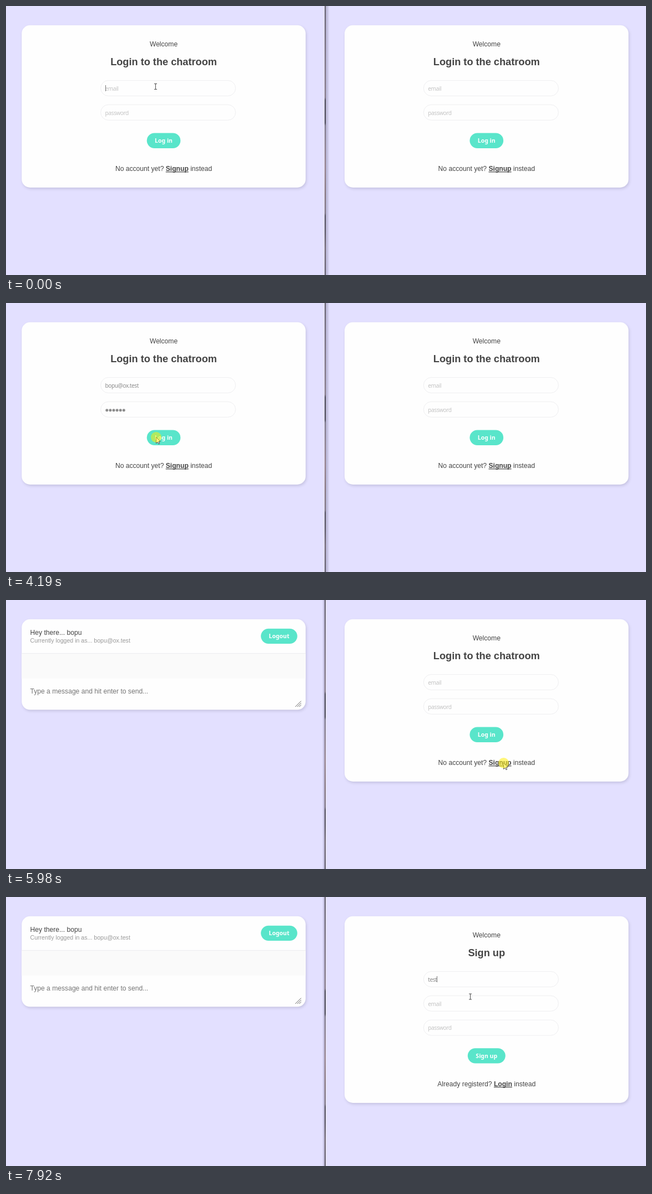
An HTML page with a canvas for the animation above (7990 ms loop, 1153 by 486 pixels).

```html
<!DOCTYPE html>
<html lang="en">
<head>
<meta charset="utf-8">
<title>Chatroom login</title>
<style>
html, body { margin: 0; width: 100%; height: 100%; overflow: hidden; background: #e3e0ff; }
canvas { display: block; width: 1153px; height: 486px; }
</style>
</head>
<body>
<canvas id="stage"></canvas>
<script>
const W = 1153, H = 486, LOOP = 7990;
const canvas = document.getElementById('stage');
const ratio = window.devicePixelRatio || 1;
canvas.width = Math.round(W * ratio);
canvas.height = Math.round(H * ratio);
const ctx = canvas.getContext('2d', { alpha: false });

const SANS = '"Liberation Sans", Arial, sans-serif';
const BODY = `12.12px ${SANS}`;
const BOLD = `bold 12.12px ${SANS}`;
const SMALL = `10.6px ${SANS}`;
const HEADING = `bold 18.18px ${SANS}`;
const FIELD = '10.2px "Noto Sans", sans-serif';
const BUTTON = 'bold 10.5px "Noto Sans", sans-serif';

const INK = '#444', GREY = '#8c8c8c', HINT = '#c4c4c4', TEAL = '#59e5ca';
const NAME = 'bopu', EMAIL = NAME + '@ox.test';
const LEFT = 28.3, RIGHT = 610, CARD_W = 511.5;
const FIELD_TOPS = [134, 177.8, 221.6];
const DOT_STEP = 6.1;

const NAME_KEYS = [610, 750, 950, 1020];
const DOT_KEYS = [2490, 2590, 2690, 3150, 3290, 3430];
const TEST_KEYS = [7510, 7580, 7720, 7790];
const LOGIN_AT = 4530, FOCUS_AT = 5980, SIGNUP_AT = 6040;

// time, x, y of the pointer
const PATH = [
  [0, 269.5, 145.5], [3500, 269.5, 145.5], [3910, 263, 248], [3980, 258, 250],
  [4100, 270.5, 242.5], [4600, 270.5, 242.5], [5090, 857, 241.5],
  [5400, 896, 299], [5510, 892.5, 302], [5710, 892.5, 302],
  [5780, 896.5, 294.5], [6400, 896.5, 294.5], [7000, 848.5, 153.5],
  [7780, 848.5, 153.5], [7920, 836.5, 180]
];

const within = (t, a, b) => t >= a && t < b;
const typed = (keys, t) => keys.filter(k => t >= k).length;

function text(str, x, y, font, color, align = 'left', spacing = 0) {
  ctx.font = font;
  ctx.letterSpacing = spacing + 'px';
  ctx.fillStyle = color;
  ctx.textAlign = align;
  ctx.fillText(str, x, y);
  return ctx.measureText(str).width;
}

function pill(x, y, w, h, r) {
  ctx.beginPath();
  ctx.roundRect(x, y, w, h, r);
}

function card(x, bottom) {
  ctx.save();
  ctx.shadowColor = 'rgba(50,50,80,0.17)';
  ctx.shadowOffsetX = 1.5 * ratio;
  ctx.shadowOffsetY = 2.5 * ratio;
  ctx.shadowBlur = 5 * ratio;
  ctx.fillStyle = '#fefefe';
  pill(x, 34.8, CARD_W, bottom - 34.8, 15);
  ctx.fill();
  ctx.restore();
}

function button(label, cx, y, w) {
  ctx.fillStyle = TEAL;
  pill(cx - w / 2, y, w, 27.3, 13.65);
  ctx.fill();
  text(label, cx, y + 17.7, BUTTON, '#fff', 'center');
}

function caret(x, top) {
  ctx.fillStyle = '#777';
  ctx.fillRect(Math.round(x), top + 9, 1, 11);
}

// value replaces the hint once something has been typed
function field(x, top, hint, value = '', showCaret = false) {
  ctx.strokeStyle = '#efeff1';
  ctx.lineWidth = 1;
  pill(x + 142.3, top + 0.5, 243, 28, 14);
  ctx.stroke();
  const left = x + 150.3, base = top + 18.8;
  const w = text(value || hint, left, base, FIELD, value ? GREY : HINT, 'left', -0.5);
  if (showCaret) caret(value ? left + w : left + 0.4, top);
}

function passwordField(x, top, hint, count, showCaret) {
  field(x, top, count ? '' : hint);
  ctx.fillStyle = GREY;
  for (let i = 0; i < count; i++) {
    ctx.beginPath();
    ctx.arc(x + 153.5 + i * DOT_STEP, top + 16, 2.5, 0, Math.PI * 2);
    ctx.fill();
  }
  if (showCaret) caret(x + 150.6 + count * DOT_STEP, top);
}

function switchLine(cx, y, before, link, after) {
  const width = (s, f) => { ctx.font = f; ctx.letterSpacing = '0px'; return ctx.measureText(s).width; };
  let x = cx - (width(before, BODY) + width(link, BOLD) + width(after, BODY)) / 2;
  x += text(before, x, y, BODY, INK);
  const w = text(link, x, y, BOLD, INK);
  ctx.fillRect(x, y + 1.2, w, 1.2);
  text(after, x + w, y, BODY, INK);
}

function titles(cx, heading) {
  text('Welcome', cx, 73.4, BODY, INK, 'center');
  text(heading, cx, 107.2, HEADING, INK, 'center');
}

function loginCard(x, email, dots, caretAt) {
  const cx = x + CARD_W / 2;
  card(x, 328);
  titles(cx, 'Login to the chatroom');
  field(x, FIELD_TOPS[0], 'email', email, caretAt === 0);
  passwordField(x, FIELD_TOPS[1], 'password', dots, caretAt === 1);
  button('Log in', cx, 229.6, 60.6);
  switchLine(cx, 298, 'No account yet? ', 'Signup', ' instead');
}

function signupCard(x, name, showCaret) {
  const cx = x + CARD_W / 2;
  card(x, 372);
  titles(cx, 'Sign up');
  field(x, FIELD_TOPS[0], 'display name', name, showCaret);
  field(x, FIELD_TOPS[1], 'email');
  field(x, FIELD_TOPS[2], 'password');
  button('Sign up', cx, 273.2, 68);
  switchLine(cx, 341.7, 'Already registerd? ', 'Login', ' instead');
}

function chatCard(x) {
  card(x, 198.3);
  text('Hey there... ' + NAME, x + 15.2, 62.5, BODY, INK);
  text('Currently logged in as... ' + EMAIL, x + 15.2, 77, SMALL, '#999');
  button('Logout', x + 463.7, 51.7, 65.6);
  ctx.fillStyle = '#fafafa';
  ctx.fillRect(x, 96.5, CARD_W, 45.5);
  ctx.fillStyle = '#ededef';
  ctx.fillRect(x, 96, CARD_W, 1);
  text('Type a message and hit enter to send...', x + 15.2, 169.2, BODY, '#757575');
  ctx.strokeStyle = '#666';
  ctx.lineWidth = 1;
  ctx.beginPath();
  for (const d of [10.5, 7, 3.5]) {
    ctx.moveTo(x + 503.4 - d, 193);
    ctx.lineTo(x + 503.4, 193 - d);
  }
  ctx.stroke();
}

function divider(rightFocused) {
  const from = 575, to = rightFocused ? 570 : 583;
  const shade = ctx.createLinearGradient(from, 0, to, 0);
  shade.addColorStop(0, 'rgba(70,65,95,0.38)');
  shade.addColorStop(1, 'rgba(70,65,95,0)');
  ctx.fillStyle = shade;
  ctx.fillRect(Math.min(from, to), 0, Math.abs(to - from), H);

  const line = ctx.createLinearGradient(0, 0, 0, H);
  [[0, '#4c484f'], [0.34, '#77686f'], [0.35, '#2c2b32'], [0.435, '#2c2b32'],
   [0.445, '#6d6874'], [0.6, '#8b7173'], [0.7, '#75605f'], [0.77, '#6b6068'],
   [0.78, '#36333a'], [0.84, '#3c383e'], [0.9, '#5d5154'], [1, '#47444d']]
    .forEach(([p, c]) => line.addColorStop(p, c));
  ctx.fillStyle = line;
  ctx.fillRect(574.2, 0, 1.6, H);
}

function pointerAt(t) {
  let i = PATH.findIndex(p => p[0] > t);
  if (i < 0) return PATH[PATH.length - 1].slice(1);
  const [t0, x0, y0] = PATH[i - 1], [t1, x1, y1] = PATH[i];
  const k = (t - t0) / (t1 - t0), e = k * k * (3 - 2 * k);
  return [x0 + (x1 - x0) * e, y0 + (y1 - y0) * e];
}

function overField(x, y, t) {
  const onRight = x > 575;
  if (!onRight && t >= LOGIN_AT) return false;
  const left = (onRight ? RIGHT : LEFT) + 142;
  const count = onRight && t >= SIGNUP_AT ? 3 : 2;
  return within(x, left, left + 244) &&
    FIELD_TOPS.slice(0, count).some(top => within(y, top, top + 29));
}

function iBeam(x, y) {
  ctx.strokeStyle = '#4d4d4d';
  ctx.lineWidth = 1;
  ctx.beginPath();
  ctx.moveTo(x - 2.5, y - 5); ctx.lineTo(x + 2.5, y - 5);
  ctx.moveTo(x, y - 5); ctx.lineTo(x, y + 5);
  ctx.moveTo(x - 2.5, y + 5); ctx.lineTo(x + 2.5, y + 5);
  ctx.stroke();
}

function arrow(x, y) {
  ctx.beginPath();
  [[0, 0], [0, 11], [2.7, 8.6], [4.4, 12.3], [6.2, 11.5], [4.5, 7.9], [7.6, 7.6]]
    .forEach(([dx, dy]) => ctx.lineTo(x + dx, y + dy));
  ctx.closePath();
  ctx.fillStyle = '#fff';
  ctx.fill();
  ctx.strokeStyle = '#3a3a40';
  ctx.lineWidth = 0.9;
  ctx.stroke();
}

function pointer(t) {
  if (within(t, 610, 3500) || within(t, 7510, 7850)) return;
  const [x, y] = pointerAt(t);
  (overField(x, y, t) ? iBeam : arrow)(x, y);
  const pressed = within(t, 4190, 4330) || within(t, FOCUS_AT, SIGNUP_AT) || within(t, 7120, 7250);
  if (pressed) {
    ctx.fillStyle = 'rgba(255,238,0,0.52)';
    ctx.beginPath();
    ctx.arc(x, y, 9.5, 0, Math.PI * 2);
    ctx.fill();
  }
}

function draw(t) {
  ctx.setTransform(ratio, 0, 0, ratio, 0, 0);
  ctx.fillStyle = '#e3e0ff';
  ctx.fillRect(0, 0, W, H);
  divider(t >= FOCUS_AT);

  if (t < LOGIN_AT) {
    const email = t >= 1280 ? EMAIL : NAME.slice(0, typed(NAME_KEYS, t));
    const caretAt = t < 200 || within(t, 610, 1810) ? 0 : within(t, 2140, 3910) ? 1 : -1;
    loginCard(LEFT, email, typed(DOT_KEYS, t), caretAt);
  } else {
    chatCard(LEFT);
  }

  if (t < SIGNUP_AT) loginCard(RIGHT, '', 0, -1);
  else signupCard(RIGHT, 'test'.slice(0, typed(TEST_KEYS, t)), t >= 7120);

  pointer(t);
}

const start = performance.now();
function tick() {
  draw((performance.now() - start) % LOOP);
  requestAnimationFrame(tick);
}
tick();
</script>
</body>
</html>
```
